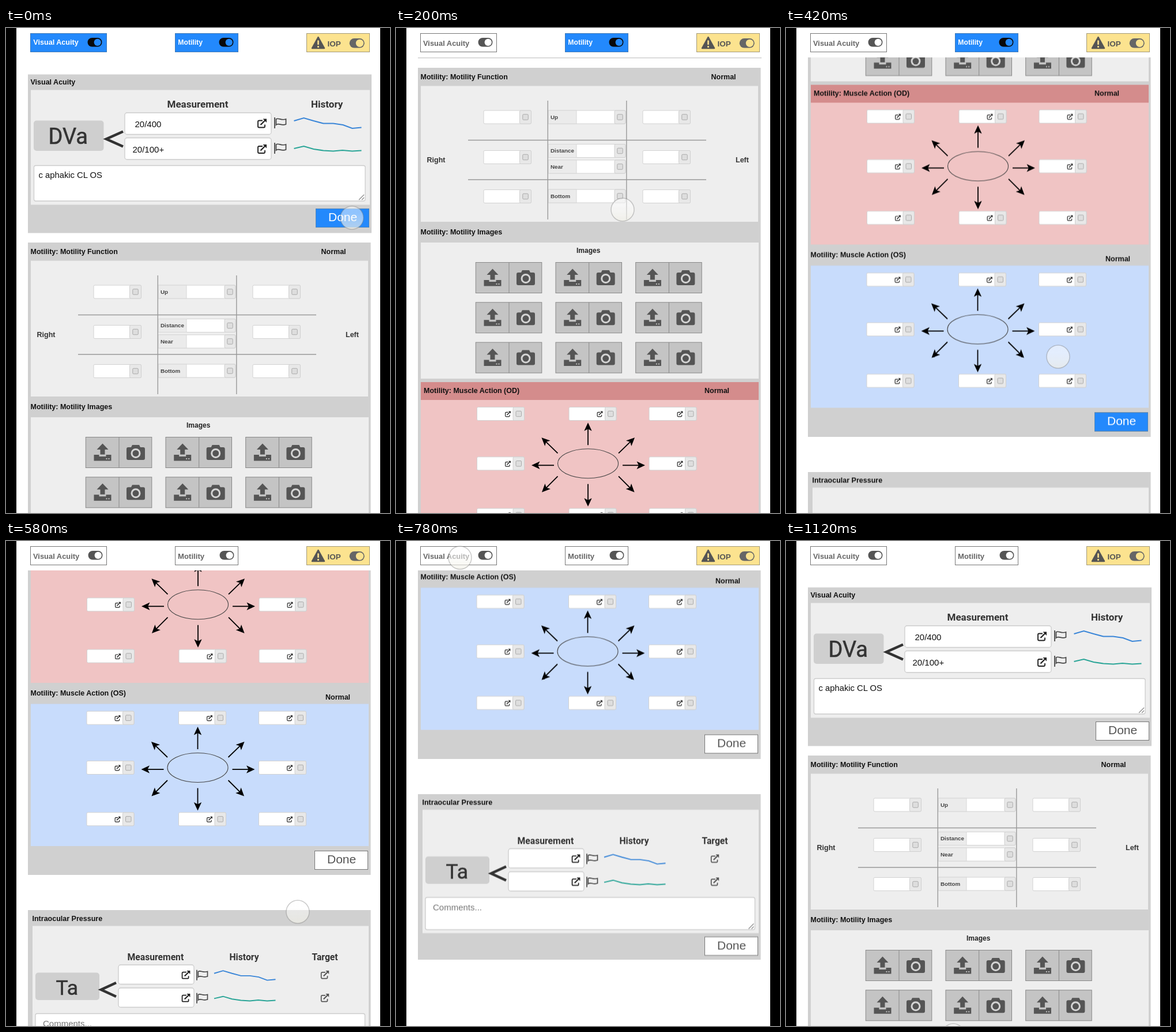
These frames come from a looping animation (666x841 px, 1.14 s). An HTML page:

```html
<!DOCTYPE html>
<html lang="en">
<head>
<meta charset="utf-8">
<title>Eye exam form</title>
<style>
html, body { margin: 0; width: 100%; height: 100%; overflow: hidden; background: #000; }
svg { display: block; width: 666px; height: 841px; }
text { font-family: "Liberation Sans", Arial, sans-serif; white-space: pre; }
.rb { font-family: Roboto, Arial, sans-serif; }
.b { font-weight: 700; }
.big { stroke: #333; stroke-width: .5px; }
#page { animation: scroll 1140ms -1ms infinite; }
#pointer { animation: move 1140ms -1ms infinite; }
.acuityOn { animation: acuity 1140ms -1ms step-end infinite; }
.motilityOn { animation: motility 1140ms -1ms step-end infinite; }
@keyframes acuity { 0% { opacity: 1 } 5.263%, 100% { opacity: 0 } }
@keyframes motility { 0% { opacity: 1 } 47.368%, 100% { opacity: 0 } }
</style>
</head>
<body>
<svg id="stage" viewBox="0 0 666 841"></svg>
<script>
const LOOP = 1140, TICK = 20;
const GREY = '#d0d0d0', PALE = '#eee', BLUE = '#2389fc', DARK = '#555';

const rect = (x, y, w, h, fill, extra = '') =>
  `<rect x="${x}" y="${y}" width="${w}" height="${h}" fill="${fill}" ${extra}/>`;
const text = (x, y, str, size = 12.5, cls = 'b', fill = '#111') =>
  `<text x="${x}" y="${y}" font-size="${size}" class="${cls}" fill="${fill}">${str}</text>`;
const line = (d, color, width, extra = '') =>
  `<path d="${d}" fill="none" stroke="${color}" stroke-width="${width}" ${extra}/>`;
const at = (x, y, body, scale = 1) =>
  `<g transform="translate(${x} ${y}) scale(${scale})">${body}</g>`;
const field = (x, y, w, h, r = 4) =>
  rect(x, y, w, h, '#fff', `rx="${r}" stroke="#ccc" stroke-width="1.3"`);

// Icons, each centred on 0,0
const openIcon = (x, y, scale = 1, color = '#222') => at(x, y,
  line('M1-5H-5a2 2 0 0 0-2 2V5a2 2 0 0 0 2 2H3a2 2 0 0 0 2-2V2', color, 1.9) +
  line('M-2.5 2.5L5-5', color, 2.3) +
  `<path d="M1.5-8H8V-1.5Z" fill="${color}"/>`, scale);
const flag = (x, y, scale = 1) => at(x, y,
  line('M-9.5-8V11', '#444', 1.8) +
  line('M-7-5C-3-8 2-2 10-5V4C2 7-3 1-7 5Z', '#444', 1.7), scale);
const upload = (x, y) => at(x, y,
  `<path d="M0-15.5L10-5H4V3.5H-4V-5H-10ZM-15 4H-6V7H6V4H15V14.5H-15Z" fill="${DARK}"/>` +
  rect(6, 10, 2, 2, '#c4c4c4') + rect(10, 10, 2, 2, '#c4c4c4'));
const camera = (x, y) => at(x, y,
  `<path d="M-13-9H-8L-6-13H6L8-9H13a3 3 0 0 1 3 3V10a3 3 0 0 1-3 3H-13a3 3 0 0 1-3-3V-6a3 3 0 0 1 3-3Z" fill="${DARK}"/>` +
  `<circle cy="1.5" r="7" fill="${DARK}" stroke="#d4d4d4" stroke-width="3"/>`);
const checkbox = (x, y, s = 9.5) =>
  rect(x - s / 2, y - s / 2, s, s, '#dedede', 'rx="1.5" stroke="#aaa"');
const grip = (x, y) => line(`M${x - 9} ${y}l9-9M${x - 4} ${y}l4-4`, '#888', 1.2);
const chevron = (x, y, w, h) =>
  line(`M${x + w} ${y}L${x + 3} ${y + h / 2}L${x + w} ${y + h}`, '#333', 4.6);

const pill = (x, y, color, knob, w = 25, h = 15.5) =>
  rect(x - w / 2, y - h / 2, w, h, color, `rx="${h / 2}"`) +
  `<circle cx="${x + w / 2 - h / 2}" cy="${y}" r="${h / 2 - 1.6}" fill="${knob}"/>`;

function tab(x, w, label, onSize, offSize, cls) {
  const box = (fill, stroke) => rect(x, 9.5, w, 32, fill, `stroke="${stroke}"`);
  return box('#fff', '#777') + text(x + 4.5, 30.5, label, offSize, 'b', '#666') +
    pill(x + w - 19.5, 24.8, DARK, '#fff') +
    `<g class="${cls}">` + box(BLUE, '#3f78b4') + text(x + 4.8, 29.3, label, onSize, 'b', '#fff') +
    pill(x + w - 20.5, 24.8, '#0a0a0a', BLUE) + '</g>';
}

function done(x, y, cls) {
  const face = (fill, stroke, ink) =>
    rect(x, y, 92, 32, fill, `stroke="${stroke}"`) + text(x + 21.5, y + 21.7, 'Done', 21, '', ink);
  return face('#fff', '#777', DARK) +
    (cls ? `<g class="${cls}">${face(BLUE, '#4d86bd', '#fff')}</g>` : '');
}

// White box with a grey checkbox cell at its right
const cell = (x, cy, w, boxW, h = 23) =>
  rect(x, cy - h / 2, w, h, '#fff', 'rx="2" stroke="#d2d2d2"') +
  rect(x + w - boxW, cy - h / 2, boxW, h, '#e8e8e8', 'rx="2" stroke="#d0d0d0"') +
  checkbox(x + w - boxW / 2, cy);

const history = (x, y, gap, scale) => at(x, y,
  line('M0 5L17 0L34 5L51 9.5H68L85 12L101 18L117 16.5', '#3a86d8', 2.1), scale) +
  at(x, y + gap, line('M0 4L17 0L34 5L51 7.5L68 8.5L84 7L101 8.5L117 7.5', '#2aa597', 2.1), scale);

function acuityPanel() {
  return rect(38, 80.5, 596, 275, GREY) + rect(43, 107.5, 588, 199, PALE) +
    text(42.5, 98, 'Visual Acuity') +
    text(279.5, 137.5, 'Measurement', 17, 'rb b', '#333') +
    text(529, 137.5, 'History', 17, 'rb b', '#333') +
    rect(48, 160.5, 121.5, 52.5, '#cfcfcf', 'rx="5"') +
    text(73.5, 201, 'DVa', 38, 'rb big', '#333') + chevron(171, 179.5, 32, 26) +
    field(206, 147, 254, 37.5) + field(206, 190.5, 254, 37.5) +
    text(223.5, 172, '20/400', 15, '') + text(219.5, 216, '20/100+', 15, '') +
    openIcon(444, 165.5) + openIcon(444, 210) + flag(475.5, 163) + flag(475.5, 207) +
    history(499.5, 156, 49, 1) +
    field(48.5, 238.5, 574.5, 61.5, 3) + grip(621, 298) +
    text(56.5, 260, 'c aphakic CL OS', 14.8, '') +
    done(537.5, 313.5, 'acuityOn');
}

function functionGrid() {
  let out = rect(43, 403.5, 585, 235.5, PALE) +
    text(42.5, 391.5, 'Motility: Motility Function') + text(546.5, 391.5, 'Normal') +
    text(53.5, 535.5, 'Right', 12.5, 'b', '#333') + text(589, 535.5, 'Left', 12.5, 'b', '#333');
  for (const cy of [457.5, 527, 595]) out += cell(152, cy, 82.5, 20) + cell(428, cy, 82.5, 20);
  [['Up', 457.5], ['Distance', 516], ['Near', 543.5], ['Bottom', 594.5]].forEach(([label, cy]) => {
    out += cell(264, cy, 134, 19) + rect(264, cy - 11.5, 49, 23, '#ebebeb', 'stroke="#d8d8d8"') +
      text(268, cy + 3, label, 9.8, 'b', '#444');
  });
  return out + line('M263.3 429V635M399.8 429V635M125 497.5H538M125 566H538', '#999', 1.4);
}

function images() {
  let out = rect(43, 675, 586, 236, PALE) + text(42.5, 661, 'Motility: Motility Images') +
    text(313, 692.7, 'Images', 12, 'b', '#222');
  for (let i = 0; i < 9; i++) {
    const x = 138.3 + i % 3 * 138.7, y = 709.5 + Math.floor(i / 3) * 69.3;
    out += rect(x, y, 114.5, 53, '#c4c4c4', 'stroke="#888"') + line(`M${x + 57.7} ${y}v53`, '#888', 1) +
      upload(x + 29.2, y + 26.5) + camera(x + 86.7, y + 26.5);
  }
  return out;
}

// Eight fields and arrows around the ellipse, whose centre is x,y
function muscles(x, y) {
  let out = `<ellipse rx="52.5" ry="25.5" fill="none" stroke="#444" stroke-width="1.1"/>`;
  for (const cx of [-192.5, -33, 106]) for (const cy of [-86.3, 0, 89.3]) {
    if (cx === -33 && cy === 0) continue;
    out += cell(cx, cy, 82, 19.5) + openIcon(cx + 53.5, cy + .5, .62);
  }
  const arrow = (ax, ay, deg) =>
    `<g transform="translate(${ax} ${ay}) rotate(${deg})"><path d="M0 0H30" stroke="#000" stroke-width="1.8"/>` +
    '<path d="M39 0L24.5 6.7L28 0L24.5-6.7Z"/></g>';
  [[60, 3, 0], [53, 22, 45], [0, 35.5, 90], [-52.5, 22, 135], [-59, 3, 180],
   [-52.5, -18, 224], [0, -32, 270], [53, -18, 316]].forEach(a => out += arrow(...a));
  return at(x, y, out);
}

function motilityPanel() {
  return rect(38, 372, 594.5, 1155, GREY) + functionGrid() + images() +
    rect(43, 917, 586, 31, '#d48c8c') + rect(43, 948, 586, 246, '#f0c4c4') +
    text(48, 935.8, 'Motility: Muscle Action (OD)') + text(535, 935.8, 'Normal') +
    muscles(333, 1058.3) +
    text(42.5, 1216.3, 'Motility: Muscle Action (OS)') + text(554, 1222.8, 'Normal') +
    rect(43, 1230.5, 586, 246.5, '#c8dcfc') + muscles(332.5, 1341) +
    done(535.5, 1485.5, 'motilityOn');
}

function pressurePanel() {
  let out = rect(38, 1588, 594.5, 287, GREY) + rect(46, 1615.5, 583, 214, PALE) +
    text(45.5, 1606.5, 'Intraocular Pressure');
  [[210.5, 'Measurement'], [387.5, 'History'], [530.5, 'Target']].forEach(([x, label]) =>
    out += text(x, 1675.2, label, 15.7, 'rb b', '#333'));
  out += rect(51, 1696.5, 111, 47.5, '#cfcfcf', 'rx="5"') +
    text(86.5, 1734.5, 'Ta', 35.5, 'rb big', '#333') + chevron(162, 1714, 29, 24);
  for (const y of [1699.8, 1739.8])
    out += field(195, y - 16.8, 131, 33.5) + openIcon(312, y + .5, .92) +
      flag(340, y - .5, .95) + openIcon(553, y + .5, .9, DARK);
  return out + history(361, 1693.2, 44.5, .91) +
    field(51, 1767.5, 571.5, 56, 3) + grip(620.5, 1822) +
    text(64, 1790, 'Comments...', 15, '', '#777') + done(535.5, 1836, '');
}

const warning = '<path d="M541.5 16L552 35H531Z" fill="#555" stroke="#555" stroke-width="2.5" stroke-linejoin="round"/>' +
  line('M541.5 21.5V29M541.5 31V34', '#fce38f', 2.6);
const header = rect(18, 0, 631, 51, '#fff') +
  tab(42.5, 132, 'Visual Acuity', 12.6, 12.9, 'acuityOn') +
  tab(293.5, 109, 'Motility', 12.2, 13.2, 'motilityOn') +
  rect(521.5, 9.5, 109, 32, '#fce38f', 'stroke="#a39a78"') + warning +
  text(557.5, 32, 'IOP', 13.5, 'b', DARK) + pill(608.7, 26.3, '#666', '#fce38f', 26, 16.5);

const pointer = '<linearGradient id="glass" x2="0" y2="1">' +
  '<stop offset=".3" stop-color="#fff" stop-opacity=".5"/>' +
  '<stop offset="1" stop-color="#f0efe6" stop-opacity=".7"/></linearGradient>' +
  '<circle id="pointer" r="20" fill="url(#glass)" stroke="#777" stroke-opacity=".38" stroke-width="1.5"/>';

document.getElementById('stage').innerHTML =
  rect(0, 0, 666, 841, '#000') + rect(18, 0, 631, 841, '#fff') +
  `<g id="page">${acuityPanel()}${motilityPanel()}${pressurePanel()}</g>` + header + pointer;

// Points are [ms, x, y]; the pose advances once per tick
function keyframes(name, points) {
  return `@keyframes ${name} {` + points.map(([ms, x, y], i) => {
    const next = points[i + 1] || [ms + TICK];
    return `${ms / LOOP * 100}% { transform: translate(${x}px, ${y}px);` +
      ` animation-timing-function: steps(${(next[0] - ms) / TICK}) }`;
  }).join('') + '}';
}
const scroll = [[0, 0], [60, 0], [80, 40], [120, 240], [140, 290], [160, 303], [220, 303],
  [240, 335], [300, 595], [320, 626], [340, 650], [400, 803], [420, 818.5], [540, 818.5],
  [560, 860], [580, 948], [600, 1055], [620, 1125], [640, 1149.5], [980, 1149.5],
  [1000, 1090], [1060, 140], [1080, 25], [1100, 0], [1140, 0]].map(([ms, y]) => [ms, 0, -y]);
const move = [[0, 600, 329], [60, 598, 329], [200, 393, 315], [320, 476, 398], [420, 472, 570],
  [480, 580, 683], [540, 580, 683], [580, 506, 643], [740, 130, 60], [780, 111, 29],
  [960, 111, 29], [1120, 290, 857], [1140, 290, 857]];
const style = document.createElement('style');
style.textContent = keyframes('scroll', scroll) + keyframes('move', move);
document.head.append(style);
</script>
</body>
</html>
```
